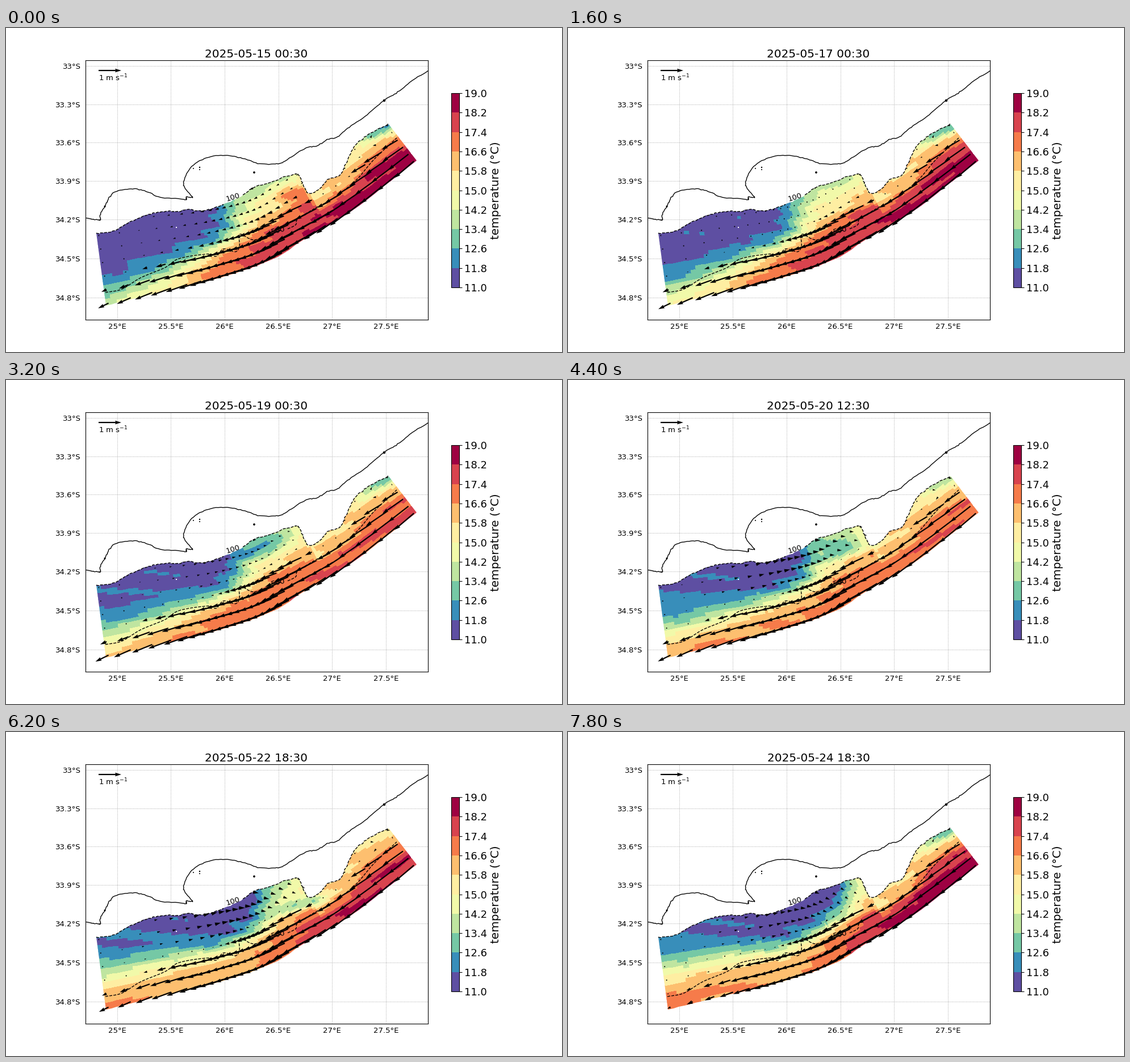
Write a matplotlib script that moves like this. It is 979 px wide and 572 px high and loops after 8000 ms.

```python
import numpy as np
import matplotlib.pyplot as plt
from matplotlib.animation import FuncAnimation
from matplotlib.colors import BoundaryNorm
from matplotlib.path import Path

W, H, FRAMES = 979, 572, 40
LEFT, RIGHT, TOP, BOTTOM = 139.5, 742.5, 57.2, 514.8
rng = np.random.default_rng(4)
plt.rcParams.update({"font.family": "DejaVu Sans", "font.size": 13.3,
                     "axes.linewidth": 1.1})


def smooth(points, wobble=0.0, n=8):
    """Catmull-Rom curve through points, with an optional ragged edge."""
    p = np.array(points, float)
    p = np.vstack([2 * p[0] - p[1], p, 2 * p[-1] - p[-2]])
    t = np.linspace(0, 1, n, endpoint=False)[:, None]
    parts = [b + .5 * t * (c - a + t * (2 * a - 5 * b + 4 * c - d
                                        + t * (3 * (b - c) + d - a)))
             for a, b, c, d in zip(p, p[1:], p[2:], p[3:])]
    curve = np.vstack(parts + [p[-2]])
    return curve + rng.normal(0, wobble, curve.shape)


def step(z):
    return 1 / (1 + np.exp(-z))


def bell(z):
    return np.exp(-z ** 2)


# Map lines, in stage pixels
coast = smooth([
    (139, 335), (158, 338), (166, 339), (166, 329), (175, 313), (183, 298),
    (195, 288), (220, 284), (243, 287), (272, 299), (301, 301), (317, 303),
    (318, 298), (329, 299), (316, 284), (313, 270), (327, 244), (357, 228),
    (390, 225), (420, 231), (443, 239), (474, 240), (491, 235), (526, 213),
    (549, 208), (566, 197), (584, 192), (604, 175), (632, 157), (665, 128),
    (690, 113), (718, 91), (743, 76)], .4)
shelf = smooth([
    (159, 362), (188, 359), (222, 341), (255, 328), (285, 323), (300, 324),
    (322, 320), (345, 323), (380, 313), (410, 299), (440, 280), (465, 273),
    (500, 260), (515, 259), (523, 276), (534, 292), (552, 284), (566, 268),
    (588, 260), (597, 243), (613, 210), (638, 188), (674, 170)], .5)
slope = smooth([
    (175, 467), (204, 461), (237, 441), (280, 423), (305, 407), (355, 399),
    (370, 403), (383, 390), (404, 395), (411, 385), (412, 364), (436, 374),
    (470, 364), (508, 349), (514, 337), (548, 316), (574, 302), (615, 270),
    (648, 232), (688, 194)])
rim = smooth([(176, 490), (257, 470), (380, 440), (470, 408), (530, 370),
              (610, 322), (723, 234)])
domain = Path(np.vstack([rim, shelf[::-1]]))


# Model grid: columns lean seaward to landward, fine in the middle
def above_rim(x, d):
    """Stage position at height d over rim abscissa x."""
    lean = np.interp(x, [176, 380, 723], [.14, .3, .77])
    return x - d * lean, np.interp(x, *rim.T) - d


def row_step(x):
    return np.interp(x, [176, 500, 723], [24, 16, 12.4]) / 4


def contains(x, y):
    return domain.contains_points(np.c_[x.ravel(), y.ravel()]).reshape(x.shape)


fine = np.linspace(176, 723, 1200)
gap = np.interp(fine, [176, 240, 400, 480, 650, 723], [39, 38, 14, 11, 28, 29])
count = np.cumsum(1 / gap) * (fine[1] - fine[0])
ncol = 4 * int(count[-1] - count[0]) + 1
edges = np.interp(np.linspace(count[0], count[-1], ncol + 1), count, fine)
NROW = 32
J, X = np.meshgrid(np.arange(NROW) + .5, (edges[1:] + edges[:-1]) / 2, indexing="ij")
D = J * row_step(X)
SX, SY = above_rim(X, D)

# R runs from 0 at the offshore rim to 1 at the shelf contour
ray_d, ray_x = np.meshgrid(np.arange(1, 150), X[0], indexing="ij")
reach = np.maximum(contains(*above_rim(ray_x, ray_d)).sum(axis=0), 40)
R = np.clip(D / reach, 0, 1)

# Patchy texture carried with the flow
waves = [(rng.uniform(.15, .6), rng.uniform(.3, 1.2), rng.uniform(0, 6))
         for _ in range(4)]


def texture(q):
    c = np.arange(ncol)
    return .13 * sum(np.sin(a * c + b * J + p + 9 * q) for a, b, p in waves)


def temperature(q):
    """Cold shelf pool meeting the warm jet; one unit is one colour band."""
    west = 4.5 + 2.5 * min(1, 1.8 * q)
    centre = 6.8 + .8 * np.cos(2 * np.pi * (q - .15) / 1.4)
    east = 8.2 + .9 * np.cos(2 * np.pi * (q - .08) / .9)
    jet = np.interp(X, [190, 400, 600], [west, centre, east])

    pool_end = 430 + 100 * q ** 2
    inshore = 4.6 * step((X - pool_end) / 14) + step((X - 565) / 10)
    inshore += .9 * q ** 2 * step((240 - X) / 25)
    inshore -= 1.8 * step((R - .85) / .05) * step((X - 440) / 15) * step((560 - X) / 8)
    corner = 1 - .9 * bell((q - .74) / .16)
    inshore -= 4.5 * corner * step((R - .85) / .05) * step((X - 675) / 12)

    front = np.interp(X, [176, 290, 400, 720],
                      [.15 + .38 * q, .22 + .27 * q, .47, .55])
    width = np.interp(X, [176, 400, 720], [.14, .08, .11])
    band = inshore + (jet - inshore) * step((front - R) / width)

    # Cold tongue drifting east, warm eddy dying out
    dx, dy = SX - 385 - 170 * q, SY - 290 - 16 * q
    along, across = dx * .95 - dy * .3, dx * .3 + dy * .95
    band -= 3 * step((q - .32) / .05) * step((.9 - q) / .04) \
        * bell(along / 42) * bell(across / 15)
    band += 2.2 * np.exp(-q / .15) * bell((SX - 500 + 220 * q) / 34) * bell((SY - 292) / 16)
    return 11.4 + .8 * np.clip(band + texture(q), 0, 9)


# Arrow sites: every fourth cell inside the domain
QX, QY, AX, AR = (g[::4, ::4] for g in (SX, SY, X, R))
QX, QY, AX, AR = (g[contains(SX, SY)[::4, ::4]] for g in (QX, QY, AX, AR))
jet_edge = np.interp(AX, [176, 290, 400, 520, 720], [.2, .32, .42, .5, .68])
jet_speed = (np.interp(AX, [176, 290, 420, 720], [20, 38, 47, 45])
             * step((jet_edge - AR) / .06) / step(jet_edge / .06))
jet_angle = np.radians(np.interp(AX, [176, 300, 420, 600, 720],
                                 [27, 20, 18, 37, 41]) - 14 * AR)
near = (step((AR - jet_edge - .12) / .05) * bell((AX - 440) / 185)
        * step((575 - AX) / 12))
corner_site = bell((QX - 660) / 24) * bell((QY - 187) / 20)


def current(q):
    """Arrow vectors in pixels: offshore jet, coastal flow, corner gust."""
    a = jet_speed * np.interp(AX, [176, 400], [1 + .9 * q - 1.6 * q ** 3, 1])
    b = near * np.interp(q, [0, .2, .67, .8, 1], [7, 0, -14, -11, -9])
    turn = np.radians(np.interp(AX, [400, 520], [15, 30 - 60 * q]))
    gust = bell((q - .68) / .12)
    u = -a * np.cos(jet_angle) - b * np.cos(turn) + (5 + 16 * gust) * corner_site
    v = a * np.sin(jet_angle) + b * np.sin(turn) + (28 * gust - 10) * corner_site
    return u, v


def draw_contour(curve, hole, label, xy, angle):
    x, y = curve.T.copy()
    x[(x > hole[0]) & (x < hole[1])] = np.nan
    ax.plot(x, y, "k--", lw=1.35, zorder=3)
    ax.text(*xy, label, rotation=angle, ha="center", va="center", zorder=3)


fig = plt.figure(figsize=(W / 72, H / 72), dpi=72, facecolor="white")
ax = fig.add_axes([LEFT / W, 1 - BOTTOM / H, (RIGHT - LEFT) / W, (BOTTOM - TOP) / H])
ax.set(xlim=(LEFT, RIGHT), ylim=(BOTTOM, TOP))
ax.set_xticks(195.5 + 94.7 * np.arange(6),
              [f"{v:g}°E" for v in np.arange(25, 28, .5)])
k = np.arange(7)
ax.set_yticks(67.4 + 67.1 * k + .16 * k ** 2, [f"{33 + .3 * n:.3g}°S" for n in k])
ax.tick_params(length=0)
ax.tick_params(axis="x", pad=6.5)
ax.tick_params(axis="y", pad=8)
ax.grid(color="gray", alpha=.8, lw=.9, ls=":")
ax.set_axisbelow(True)

levels = 11 + .8 * np.arange(11)
JE, XE = np.meshgrid(np.arange(NROW + 1), edges, indexing="ij")
mesh = ax.pcolormesh(*above_rim(XE, JE * row_step(XE)), temperature(0),
                     cmap=plt.get_cmap("Spectral_r", 10),
                     norm=BoundaryNorm(levels, 10), zorder=2)
mesh.set_clip_path(domain, ax.transData)
ax.plot(300, 352.5, "ws", ms=2.5, mew=0, zorder=3)

ax.plot(*coast.T, "k", lw=1.35, zorder=3)
islets = np.array([(330, 248), (341, 246), (341, 250), (437, 255), (666, 128), (174, 315)])
ax.scatter(*islets.T, s=[4, 6, 4, 14, 20, 10], c="k", lw=0, zorder=3)
draw_contour(shelf, (387, 414), "100", (400, 299), 17)
draw_contour(slope, (466, 494), "500", (479.5, 358), 14)

arrow = dict(angles="xy", scale_units="xy", scale=1, units="dots", width=2.2, zorder=4)
quiver = ax.quiver(QX, QY, *current(0), **arrow)
ax.quiver([163], [75], [40], [0], **arrow)
ax.text(189, 88, "1 m s$^{-1}$", ha="center", va="center")
title = ax.set_title("", fontsize=20, pad=5.2)

cax = fig.add_axes([784 / W, 1 - 458 / H, 14 / W, 343 / H])
bar = fig.colorbar(mesh, cax=cax, ticks=levels, format="%.1f")
bar.ax.tick_params(labelsize=18, length=4.7, width=1.1, pad=4.7)
bar.ax.minorticks_off()
fig.text(862 / W, 1 - 286.5 / H, "temperature (°C)", fontsize=20, rotation=90,
         ha="center", va="center")


def update(i):
    q = i / (FRAMES - 1)
    when = np.datetime64("2025-05-15T00:30") + np.timedelta64(6 * i, "h")
    title.set_text(str(when).replace("T", " "))
    mesh.set_array(temperature(q))
    quiver.set_UVC(*current(q))
    return mesh, quiver, title


anim = FuncAnimation(fig, update, frames=FRAMES, interval=200, repeat=True,
                     repeat_delay=0, blit=False)
plt.show()
```
